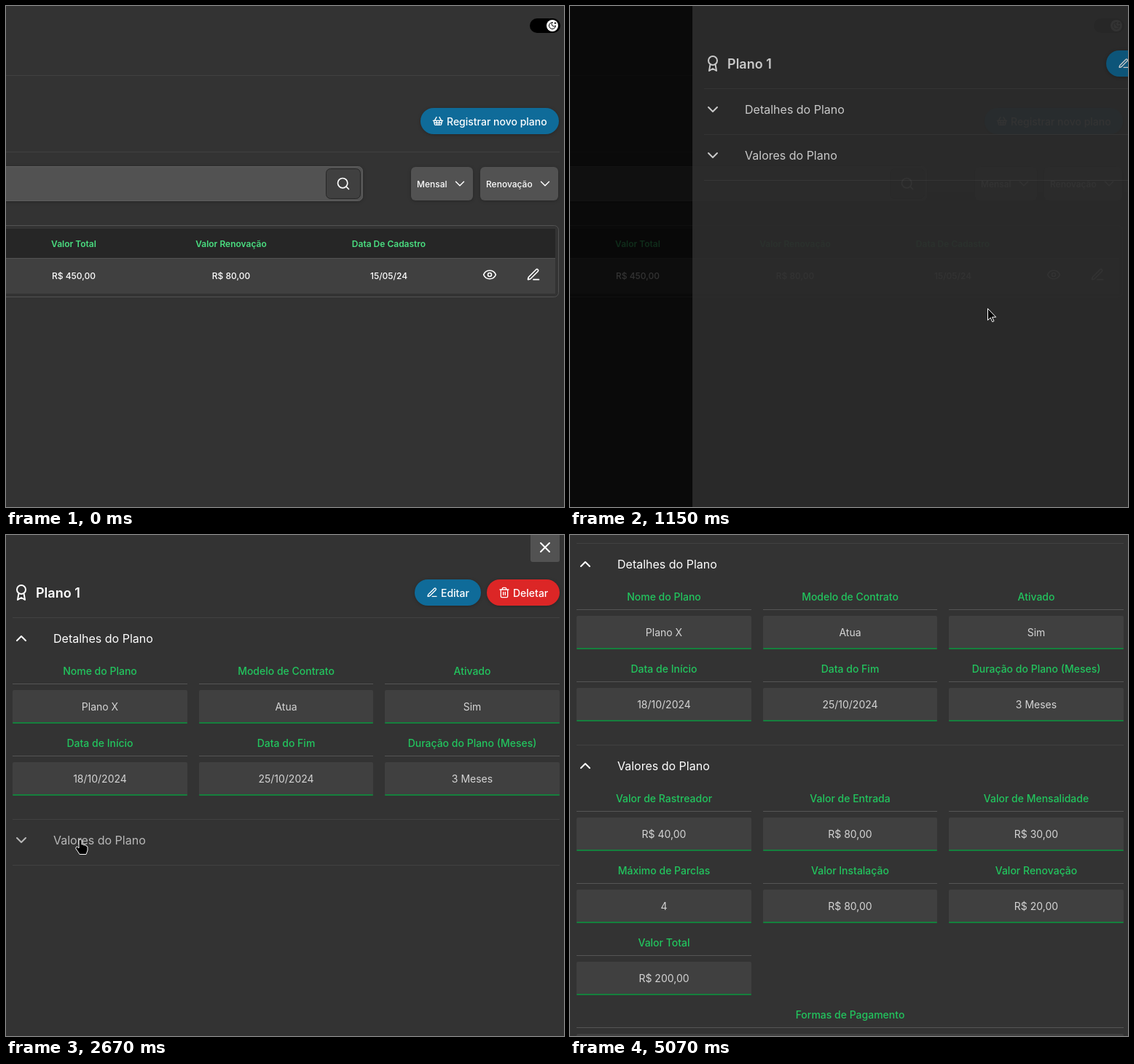
An HTML page that plays this animation: 766x688 px, repeating every 5410 ms.

```html
<!DOCTYPE html>
<html lang="pt-BR">
<head>
<meta charset="utf-8">
<title>Planos</title>
<style>
  html, body { margin: 0; width: 100%; height: 100%; overflow: hidden; background: #333; }
  svg { display: block; width: 100vw; height: 100vh; font-family: Inter, Roboto, sans-serif; }
  .icon { fill: none; stroke: #fff; stroke-linecap: round; stroke-linejoin: round; }
  .raised { filter: drop-shadow(0 1px 2px rgba(0, 0, 0, .25)); }
</style>
</head>
<body>
<svg id="stage" viewBox="0 0 766 688"></svg>
<script>
const LOOP = 5410, TICK = 10;
const DETAILS_H = 214, VALUES_H = 412, SLIDE = 800, SCROLL = 102;

const ICONS = {
  basket: 'm15 11-1 9m5-9-4-7M2 11h20M3.5 11l1.6 7.4a2 2 0 0 0 2 1.6h9.8a2 2 0 0 0 2-1.6l1.7-7.4M4.5 15.5h15M5 11l4-7m0 7 1 9',
  search: 'M19 11a8 8 0 1 1-16 0a8 8 0 1 1 16 0M21 21l-4.3-4.3',
  chevron: 'm6 9 6 6 6-6',
  eye: 'M2.1 12.35a1 1 0 0 1 0-.7a10.75 10.75 0 0 1 19.8 0a1 1 0 0 1 0 .7a10.75 10.75 0 0 1-19.8 0M15 12a3 3 0 1 1-6 0a3 3 0 1 1 6 0',
  pen: 'M12 20h9M16.376 3.622a1 1 0 0 1 3.002 3.002L7.368 18.635a2 2 0 0 1-.855.506l-2.872.838a.5.5 0 0 1-.62-.62l.838-2.872a2 2 0 0 1 .506-.854z',
  trash: 'M3 6h18m-2 0v14c0 1-1 2-2 2H7c-1 0-2-1-2-2V6m3 0V4c0-1 1-2 2-2h4c1 0 2 1 2 2v2M10 11v6m4-6v6',
  award: 'M18 8a6 6 0 1 1-12 0a6 6 0 1 1 12 0M15.477 12.89 17 22l-5-3-5 3 1.523-9.11',
  close: 'M18 6 6 18M6 6l12 12',
  moon: 'M12 3a6 6 0 0 0 9 9 9 9 0 1 1-9-9ZM20 3v4m2-2h-4'
};

// Markup helpers
const rect = (x, y, w, h, fill, rx = 0, more = '') =>
  `<rect x="${x}" y="${y}" width="${w}" height="${h}" rx="${rx}" fill="${fill}" ${more}/>`;
const text = (x, y, s, size, weight = 400, fill = '#fff', anchor = 'start') =>
  `<text x="${x}" y="${y}" font-size="${size}" font-weight="${weight}" fill="${fill}" text-anchor="${anchor}">${s}</text>`;
const place = (cx, cy, size, turn = 0) =>
  `translate(${cx} ${cy}) scale(${size / 24}) rotate(${turn}) translate(-12 -12)`;
const icon = (name, cx, cy, size, width = 2, more = '') =>
  `<path class="icon" d="${ICONS[name]}" transform="${place(cx, cy, size)}" stroke-width="${width}" ${more}/>`;
const rule = (y, x = 9, w = 751, fill = '#414141') => rect(x, y, w, 1, fill);
const raised = 'class="raised"';

function page() {
  const cell = (x, head, value) =>
    text(x, 331, head, 12, 600, '#4ade80', 'middle') + text(x, 375, value, 12, 500, '#fff', 'middle');
  return rect(0, 0, 766, 688, '#333') +
    rect(719, 17, 42, 20, '#000', 10) + '<circle cx="750" cy="27" r="8" fill="#fff"/>' +
    icon('moon', 750, 27, 12, 2, 'style="stroke:#000"') +
    rule(95, 0, 760) + rule(200, 0, 760) +
    rect(569, 140, 190, 36, '#0f6b99', 18, raised) + icon('basket', 593, 158, 16) +
    text(605, 164, 'Registrar novo plano', 14, 500) +
    rect(-20, 220.5, 509.5, 47, '#525252', 6, raised + ' stroke="#5e5e5e"') +
    rect(439.5, 223.5, 47, 41, '#404040', 6, 'stroke="#262626"') + icon('search', 463, 244, 20) +
    rect(556, 221, 85, 46, '#525252', 6, raised) + text(564, 249, 'Mensal', 12, 500) + icon('chevron', 623, 244, 22, 1.6) +
    rect(651, 221, 107, 46, '#525252', 6, raised) + text(659, 249, 'Renovação', 12, 500) + icon('chevron', 740, 244, 22, 1.6) +
    rect(-20, 301.5, 778.5, 98, 'none', 6, 'stroke="#525252"') +
    rect(0, 306, 754, 40, '#262626') + rect(0, 346, 754, 1, '#525252') + rect(0, 347, 754, 48, '#404040') +
    cell(93, 'Valor Total', 'R$ 450,00') + cell(309, 'Valor Renovação', 'R$ 80,00') +
    cell(525.5, 'Data De Cadastro', '15/05/24') +
    icon('eye', 664, 369, 20, 2, 'id="eye"') + icon('pen', 724, 369, 20);
}

function field(x, y, w, label, value) {
  const mid = x + w / 2;
  return text(mid, y + 5, label, 14, 500, '#22c55e', 'middle') + rule(y + 17, x, w, '#555') +
    rect(x, y + 26, w, 46, '#404040', 2) + rect(x, y + 70, w, 2, '#15803d', 1) +
    text(mid, y + 54, value, 14, 400, '#d4d4d4', 'middle');
}

const fields = (y, list) => list.map(([label, value], i) =>
  field([9, 265, 520][i % 3], y + 99 * Math.floor(i / 3), i % 3 === 1 ? 239 : 240, label, value)).join('');

const header = (id, y, title) =>
  `<g id="${id}Head">${icon('chevron', 21, y, 24, 2, `id="${id}Arrow"`)}${text(65, y + 6, title, 16)}</g>`;

const section = (id, y, content) =>
  `<clipPath id="${id}Clip"><rect id="${id}Box" x="0" y="${y}" width="766" height="0"/></clipPath>
   <g clip-path="url(#${id}Clip)">${content}</g>`;

function drawer() {
  const details = fields(187, [
    ['Nome do Plano', 'Plano X'], ['Modelo de Contrato', 'Atua'], ['Ativado', 'Sim'],
    ['Data de Início', '18/10/2024'], ['Data do Fim', '25/10/2024'], ['Duração do Plano (Meses)', '3 Meses']]);
  const values = fields(250, [
    ['Valor de Rastreador', 'R$ 40,00'], ['Valor de Entrada', 'R$ 80,00'], ['Valor de Mensalidade', 'R$ 30,00'],
    ['Máximo de Parclas', '4'], ['Valor Instalação', 'R$ 80,00'], ['Valor Renovação', 'R$ 20,00'],
    ['Valor Total', 'R$ 200,00']]) + field(9, 547, 751, 'Formas de Pagamento', '');
  return rect(-7, 0, 800, 688, '#333') + '<g id="scroll">' +
    rect(720, -4, 40, 41, '#525252', 3) + icon('close', 740, 17, 24) +
    icon('award', 21, 79, 24) + text(41, 86, 'Plano 1', 18, 600) +
    rect(561, 61, 91, 36, '#0f6b99', 18, raised) + icon('pen', 585, 79, 16) + text(597, 85, 'Editar', 14, 500) +
    rect(660, 61, 100, 36, '#dc2626', 18, raised) + icon('trash', 684, 79, 16) + text(696, 85, 'Deletar', 14, 500) +
    rule(113) + header('details', 142, 'Detalhes do Plano') + section('details', 176, details) +
    '<g id="second">' + rule(176) + header('values', 205, 'Valores do Plano') + section('values', 239, values) +
    '<g id="last">' + rule(239) + '</g></g></g>';
}

const pointer = `<g id="cursor" fill="#000" stroke="#fff" stroke-linejoin="round">
  <path id="arrow" d="M.5 .5V16.5L4.2 13L6.8 18.7L9 17.7L6.5 12.2H11.7Z"/>
  <path id="hand" d="M-2 1.8Q-2 0 0 0Q2 0 2 1.8V7Q4 6 5 8Q7 7 8 9Q10 9 10 11V15Q9 18 8 20.5H-1Q-3 17 -6 13Q-7 11 -5 10Q-3.5 10 -2 12Z"/>
  <circle id="click" r="12" fill="#ff0" fill-opacity=".5" stroke="none"/></g>`;

document.getElementById('stage').innerHTML =
  `${page()}<rect id="shade" width="766" height="688"/><g id="drawer">${drawer()}</g>${pointer}`;

const el = {};
document.querySelectorAll('[id]').forEach(n => el[n.id] = n);
const set = (id, name, value) => el[id].setAttribute(name, value);
const show = (id, on) => set(id, 'visibility', on ? 'visible' : 'hidden');

// Timing
const bezier = (x1, y1, x2, y2) => x => {
  const at = (a, b, u) => 3 * a * u * (1 - u) ** 2 + 3 * b * u * u * (1 - u) + u ** 3;
  let lo = 0, hi = 1;
  for (let i = 0; i < 24; i++) {
    const mid = (lo + hi) / 2;
    if (at(x1, x2, mid) < x) lo = mid; else hi = mid;
  }
  return at(y1, y2, lo);
};
const ease = bezier(.25, .1, .25, 1), easeOut = bezier(0, 0, .58, 1), easeInOut = bezier(.42, 0, .58, 1);
const part = (t, start, length, curve) => {
  const x = (t - start) / length;
  return x <= 0 ? 0 : x >= 1 ? 1 : curve(x);
};
const within = (t, a, b) => t >= a && t < b;

// Pointer stops: time, x, y
const TRAIL = [
  [70, 700, 632], [210, 686, 560], [350, 664, 440], [440, 641, 374], [520, 656, 367], [930, 656, 367],
  [1010, 642, 374], [1150, 573, 415], [1290, 400, 330], [1430, 220, 228], [1570, 120, 160], [1680, 95, 137],
  [1950, 95, 137], [2100, 97, 220], [2320, 102, 400], [2450, 102, 418], [2890, 102, 418], [2960, 130, 430],
  [3200, 400, 560], [3490, 616, 655], [3770, 687, 690],
  [4520, 640, 680], [4730, 539, 608], [5000, 696, 679], [5070, 696, 679]
];
function trail(t) {
  const i = TRAIL.findIndex(p => p[0] > t);
  if (i < 1) return [0, 0];
  const [t0, x0, y0] = TRAIL[i - 1], [t1, x1, y1] = TRAIL[i];
  const k = (t - t0) / (t1 - t0);
  return [x0 + (x1 - x0) * k, y0 + (y1 - y0) * k];
}

function draw(t) {
  const slide = part(t, 881.5, 560, ease);
  const open1 = part(t, 1910, 200, easeOut), open2 = part(t, 2760, 200, easeOut);
  const scroll = SCROLL * part(t, 2970, 450, easeInOut);
  const h1 = DETAILS_H * open1, h2 = VALUES_H * open2;

  set('shade', 'opacity', .8 * part(t, 720, 460, ease));
  const grow = part(t, 480, 100, ease) - part(t, 950, 150, ease);
  set('eye', 'transform', place(664, 369, 20 + 4 * grow));

  show('drawer', slide > 0);
  set('drawer', 'opacity', slide);
  set('drawer', 'transform', `translate(${SLIDE * (1 - slide)} 0)`);
  set('scroll', 'transform', `translate(0 ${-scroll})`);
  set('second', 'transform', `translate(0 ${h1})`);
  set('last', 'transform', `translate(0 ${h2})`);
  set('detailsBox', 'height', h1);
  set('valuesBox', 'height', h2);
  set('detailsArrow', 'transform', place(21, 142, 24, 180 * open1));
  set('valuesArrow', 'transform', place(21, 205, 24, 180 * open2));

  const visible = within(t, 70, 3770) || within(t, 4520, 5070);
  const [x, y] = trail(t);
  const over = top => visible && slide > .9 && within(y + scroll, top, top + 62);
  const over1 = over(114), over2 = over(177 + h1);
  set('detailsHead', 'opacity', over1 ? .65 : 1);
  set('valuesHead', 'opacity', over2 ? .65 : 1);

  const hand = within(t, 490, 880) || over1 || over2;
  set('cursor', 'transform', `translate(${Math.round(x)} ${Math.round(y)})`);
  show('arrow', visible && !hand);
  show('hand', visible && hand);
  show('click', within(t, 660, 790) || within(t, 1780, 1910) || within(t, 2740, 2810));
}

// Time advances in whole ticks
const begin = performance.now();
function tick() {
  draw(Math.round((performance.now() - begin) / TICK) * TICK % LOOP);
  requestAnimationFrame(tick);
}
tick();
</script>
</body>
</html>
```
